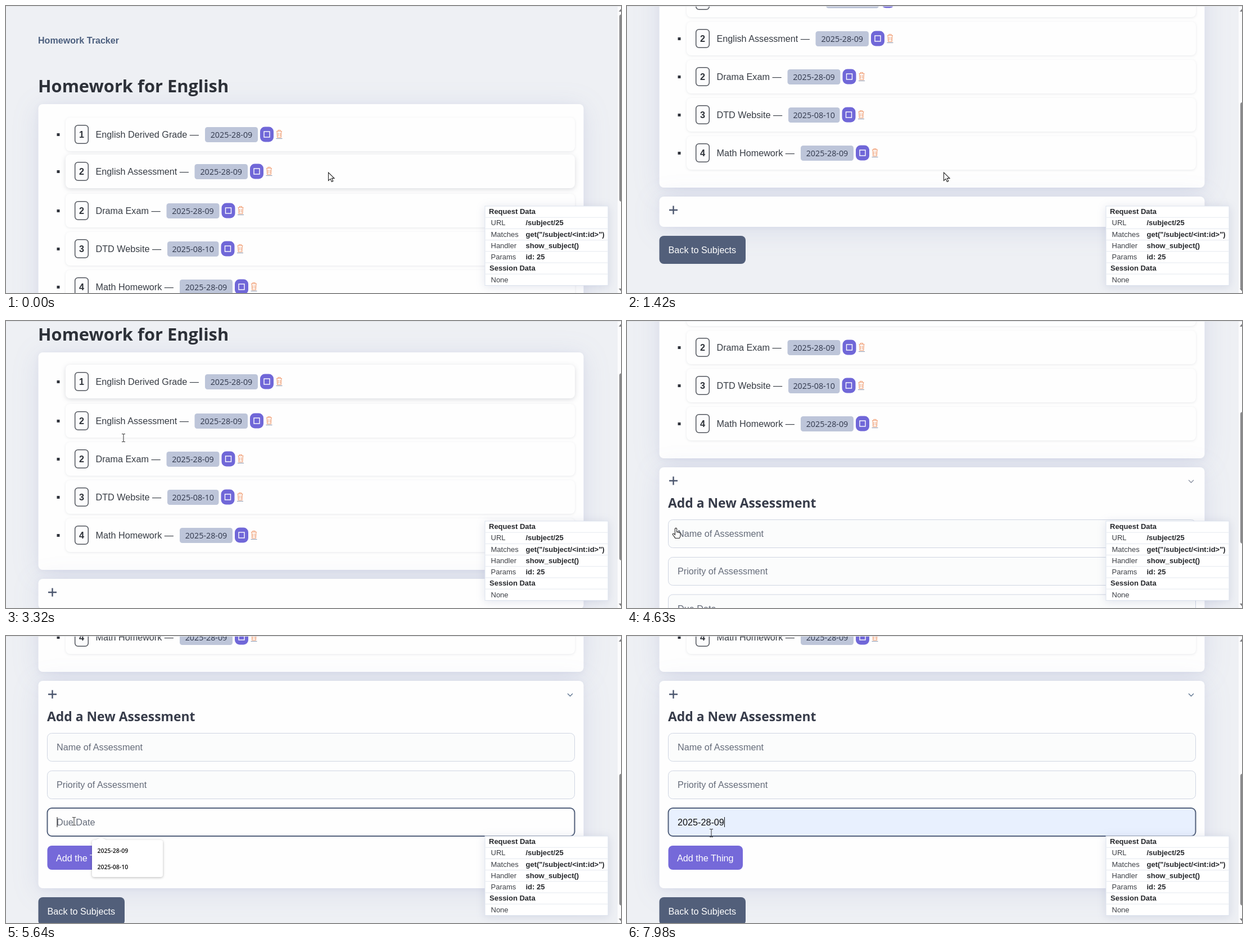
An HTML page for the animation above (8000 ms loop, 1094 by 512 pixels).

```html
<!DOCTYPE html>
<html lang="en">
<head>
<meta charset="utf-8">
<title>Homework Tracker</title>
<style>
  html, body { margin: 0; width: 100%; height: 100%; overflow: hidden; background: #eef0f4; }
  svg { display: block; width: 1094px; height: 512px; }
  text { font: 16.2px "Liberation Sans", Arial, sans-serif; fill: #373c44; white-space: pre; }
  .bold { font-weight: 700; }
  .brand { font-weight: 700; font-size: 16.1px; fill: #4d607f; }
  .title { font: 700 30.8px "Open Sans", "Noto Sans", sans-serif; fill: #2d3138; }
  .subtitle { font: 700 22.9px "Open Sans", "Noto Sans", sans-serif; fill: #373c4a; }
  .date { font: 500 14.3px "Open Sans", "Noto Sans", sans-serif; fill: #30374b; text-anchor: middle; }
  .badge { font-weight: 700; text-anchor: middle; fill: #2d3138; }
  .hint { fill: #646b79; }
  .light { fill: #fff; }
  .option { font: 600 10.5px "Open Sans", "Noto Sans", sans-serif; fill: #111; }
  .panel text { font-size: 13px; fill: #3c3f45; }
  .panel .bold { fill: #26282c; }
  .card { fill: #fefefe; filter: drop-shadow(0 2px 5px rgba(80, 90, 150, .07)) drop-shadow(0 6px 24px rgba(80, 95, 170, .12)); }
  .row { fill: #fefefe; filter: drop-shadow(0 1px 2px rgba(40, 45, 70, .10)); }
  .hover .row { filter: drop-shadow(0 2px 4px rgba(40, 45, 70, .17)); }
  .popup { fill: #fff; filter: drop-shadow(0 1px 2px rgba(0, 0, 0, .28)); }
  .overlay { fill: #fff; stroke: #dde3ee; filter: drop-shadow(0 2px 8px rgba(80, 95, 150, .16)); }
  .field { fill: #fbfcfc; stroke: #cfd5e2; }
  .line { fill: none; }
</style>
</head>
<body>
<svg id="stage" viewBox="0 0 1094 512"></svg>
<script>
const LOOP = 8000, ROW_TOP = 199, ROW_STEP = 68, ROW_HEIGHT = 60, FORM_GROWTH = 316;
const OPEN_AT = 4300, FOCUS_AT = 5440, LIST_AT = 5510, PREVIEW_AT = 6280, PICK_AT = 6980;

const tasks = [
  [1, 'English Derived Grade', '2025-28-09', 354, 94],
  [2, 'English Assessment', '2025-28-09', 335.5, 94.5],
  [2, 'Drama Exam', '2025-28-09', 285.5, 94],
  [3, 'DTD Website', '2025-08-10', 287, 91.5],
  [4, 'Math Homework', '2025-28-09', 309, 94],
];
const requestRows = [
  ['URL', '/subject/25'],
  ['Matches', 'get("/subject/<int:id>")'],
  ['Handler', 'show_subject()'],
  ['Params', 'id: 25'],
];
// Held scroll offsets: [time, offset]
const scrollKeys = [[0, 0], [610, 88], [680, 196], [750, 239], [2040, 170], [2110, 56], [2180, 0],
  [3320, 119], [3390, 239], [4630, 318], [4700, 440], [4770, 499]];
// Pointer path: [time, x, y]
const pointerKeys = [[0, 573, 297], [1340, 573, 297], [2040, 291, 289], [2180, 291, 289],
  [2930, 209, 208], [3550, 209, 208], [3900, 140, 395], [4160, 87, 371], [4770, 87, 371],
  [5380, 121, 330], [5700, 121, 330], [6280, 235, 385], [7100, 235, 385], [7640, 150, 351]];
const pointerShapes = [[0, 'arrow'], [2930, 'beam'], [3620, 'arrow'], [4090, 'hand'],
  [4770, 'beam'], [5840, 'arrow'], [7380, 'beam']];

const escapeText = s => String(s).replace(/&/g, '&amp;').replace(/</g, '&lt;');
const text = (x, y, s, cls = '', id = '') =>
  `<text x="${x}" y="${y}" class="${cls}"${id && ` id="${id}"`}>${escapeText(s)}</text>`;
const rect = (x, y, w, h, rx = 0, attrs = '') =>
  `<rect x="${x}" y="${y}" width="${w}" height="${h}" rx="${rx}" ${attrs}/>`;
const path = (d, attrs) => `<path d="${d}" ${attrs}/>`;

function trash(x) {
  return path(`M${x - 5} 24.5h10M${x - 2} 24v-1.5h4v1.5M${x - 4} 25l.7 10.5h6.6l.7-10.5M${x - 1.6} 27v6.5M${x + 1.6} 27v6.5`,
    'class="line" stroke="#f0a077" stroke-width="1.1"')
    + path(`M${x - 5.5} 37.5h11`, 'stroke="#8b93a8"');
}

function taskRow([rank, name, date, x, w], i) {
  const box = x + w + 16;
  return `<g class="task" data-top="${ROW_TOP + i * ROW_STEP}">`
    + rect(90.5, 28, 5, 5, 0, 'fill="#30343c"')
    + rect(106, 0, 906, ROW_HEIGHT, 8, 'class="row"')
    + rect(122.7, 13.7, 23.6, 32.6, 5.5, 'fill="#fcfcfd" stroke="#50545c" stroke-width="1.5"')
    + text(134.5, 36, rank, 'badge')
    + text(159.5, 36, name + ' —')
    + rect(x, 17, w, 27, 4.5, 'fill="#bdc5d9"')
    + text(x + w / 2, 36, date, 'date')
    + rect(box - 12, 16.5, 24, 27, 8.5, 'fill="#7067d8"')
    + rect(box - 5, 25, 10, 10, 0, 'class="line" stroke="#fff" stroke-width="1.4"')
    + trash(box + 22) + '</g>';
}

function field(y, label, id) {
  return rect(73.5, y, 938, 50, 8, `class="field" id="${id}"`) + text(90, y + 30.5, label, 'hint', id + 'Text');
}

function panel() {
  const lines = [1, 2, 3, 4, 5, 6].map(i => `M852.5 ${357 + i * 20.2}h218`).join('');
  return '<g class="panel">' + rect(852, 357, 219, 141.5, 0, 'class="overlay"')
    + path(lines, 'stroke="#e4e8ef"')
    + text(859, 371, 'Request Data', 'bold')
    + requestRows.map(([key, value], i) =>
      text(862.5, 391.4 + i * 20.2, key) + text(924.5, 391.4 + i * 20.2, value, 'bold')).join('')
    + text(860, 472.3, 'Session Data', 'bold') + text(862.5, 492.8, 'None') + '</g>';
}

function suggestions() {
  return '<g id="list">' + path('M157 364H160L169 358.5L178 364H275Q279 364 279 368V426Q279 430 275 430H157Q153 430 153 426V368Q153 364 157 364Z', 'class="popup"')
    + rect(153, 369, 126, 28, 0, 'id="highlight" fill="#ececef"')
    + text(162.5, 387, '2025-28-09', 'option') + text(162.5, 416, '2025-08-10', 'option') + '</g>';
}

function pointer() {
  return '<g id="pointer">'
    + path('M.5 0V14.5L4 11.3L6.4 16.5L8.8 15.4L6.5 10.4H11Z', 'id="arrow" fill="#fff" stroke="#222" stroke-width="1.1"')
    + path('M-3-6.5H-1Q0-6.5 0-5.5Q0-6.5 1-6.5H3M0-5.5V6.5M-3 7.5H-1Q0 7.5 0 6.5Q0 7.5 1 7.5H3', 'id="beam" class="line" stroke="#333"')
    + path('M-1.6 0Q-1.6-1.6 0-1.6T1.6 0V5.5Q3 4.6 4 6Q5.5 5.2 6.2 6.8Q8 6.2 8 8.3V11.5Q8 14 6.3 16.5H-1.2Q-2.4 13.8-4.8 11.3Q-6.6 9.2-5.2 8.4T-1.6 10.3Z',
      'id="hand" fill="#fff" stroke="#222" stroke-width="1.1"')
    + '</g>';
}

document.getElementById('stage').innerHTML =
  rect(0, 0, 1094, 512, 0, 'fill="#eef0f4"')
  + '<g id="page">'
  + text(57, 67, 'Homework Tracker', 'brand')
  + text(57, 153.5, 'Homework for English', 'title')
  + rect(57.5, 175, 970, 388, 8, 'class="card"')
  + tasks.map(taskRow).join('')
  + rect(57.5, 579, 970, 370, 8, 'class="card" id="formCard"')
  + path('M75 603H90M82.5 595.5V610.5', 'stroke="#4b566e" stroke-width="2.4"')
  + path('M999 601.8L1003.5 606.3L1008 601.8', 'id="chevron" class="line" stroke-width="1.3"')
  + '<g id="form">'
  + text(73, 650.5, 'Add a New Assessment', 'subtitle')
  + field(672.5, 'Name of Assessment', 'name')
  + field(739.5, 'Priority of Assessment', 'priority')
  + field(806, 'Due Date', 'due')
  + rect(0, 822, 1, 18, 0, 'id="caret" fill="#111"')
  + rect(73.5, 873, 132.5, 43, 8, 'fill="#7569d9"')
  + text(89, 900.5, 'Add the Thing', 'light') + '</g>'
  + '<g id="back">' + rect(57.5, 965, 153.5, 50, 8, 'fill="#525f7a"')
  + text(73.5, 996, 'Back to Subjects', 'light') + '</g></g>'
  + suggestions() + panel()
  + rect(1088, 0, 6, 512, 0, 'fill="#fbfbfc"')
  + rect(1091, 15, 8, 334, 4, 'id="thumb" fill="#8b8b8d"')
  + path('M1090 10L1094 5V10ZM1090 504H1094V509Z', 'fill="#7d7d80"')
  + rect(0, 0, 1094, 1, 0, 'fill="#e0e2e6"')
  + pointer();

const el = id => document.getElementById(id);
const set = (id, attrs) => Object.entries(attrs).forEach(([k, v]) => el(id).setAttribute(k, v));
const show = (id, visible) => set(id, { visibility: visible ? 'visible' : 'hidden' });
const held = (keys, t) => keys.filter(k => k[0] <= t).pop() || keys[0];

function pointerAt(t) {
  const i = pointerKeys.findIndex(k => k[0] > t);
  if (i < 0) return pointerKeys[pointerKeys.length - 1].slice(1);
  const [t0, x0, y0] = pointerKeys[i - 1], [t1, x1, y1] = pointerKeys[i];
  const p = (t - t0) / (t1 - t0), e = p * p * (3 - 2 * p);
  return [x0 + (x1 - x0) * e, y0 + (y1 - y0) * e];
}

const taskNodes = [...document.querySelectorAll('.task')];

function draw(t) {
  const scroll = held(scrollKeys, t)[1];
  const [x, y] = pointerAt(t);
  const open = t >= OPEN_AT, focused = t >= FOCUS_AT, filled = t >= PREVIEW_AT;

  set('page', { transform: `translate(0 ${-scroll})` });

  // Hover follows scrolling with a short delay.
  const hoverY = y + held(scrollKeys, t - 140)[1];
  for (const node of taskNodes) {
    const top = +node.dataset.top;
    const hover = hoverY >= top && hoverY < top + ROW_HEIGHT;
    node.setAttribute('transform', `translate(0 ${top - (hover ? 2 : 0)})`);
    node.classList.toggle('hover', hover);
  }

  show('form', open);
  set('formCard', { height: open ? 370 : 370 - FORM_GROWTH });
  set('back', { transform: `translate(0 ${open ? 0 : -FORM_GROWTH})` });
  set('chevron', { stroke: focused ? '#5d738f' : '#8b92a2' });
  set('thumb', { y: 15 + scroll * (open ? 0.4625 : 0.656), height: open ? 235 : 334 });

  el('due').style.cssText = focused
    ? `stroke:#53617c;stroke-width:2;fill:${filled ? '#e8f0fe' : '#fefefe'}` : '';
  el('dueText').textContent = filled ? '2025-28-09' : 'Due Date';
  el('dueText').style.fill = filled ? '#111' : '';
  const blinkStart = t >= PICK_AT ? PICK_AT : LIST_AT;
  show('caret', focused && Math.floor(Math.max(0, t - blinkStart) / 500) % 2 === 0);
  set('caret', { x: filled ? 173 : 90.5 });

  const listOpen = t >= LIST_AT && t < PICK_AT;
  show('list', listOpen);
  show('highlight', listOpen && filled);

  const shape = held(pointerShapes, t)[1];
  for (const id of ['arrow', 'beam', 'hand']) show(id, id === shape);
  set('pointer', { transform: `translate(${Math.round(x)} ${Math.round(y)})` });
}

const start = performance.now();
function tick() {
  draw((performance.now() - start) % LOOP);
  requestAnimationFrame(tick);
}
tick();
</script>
</body>
</html>
```
